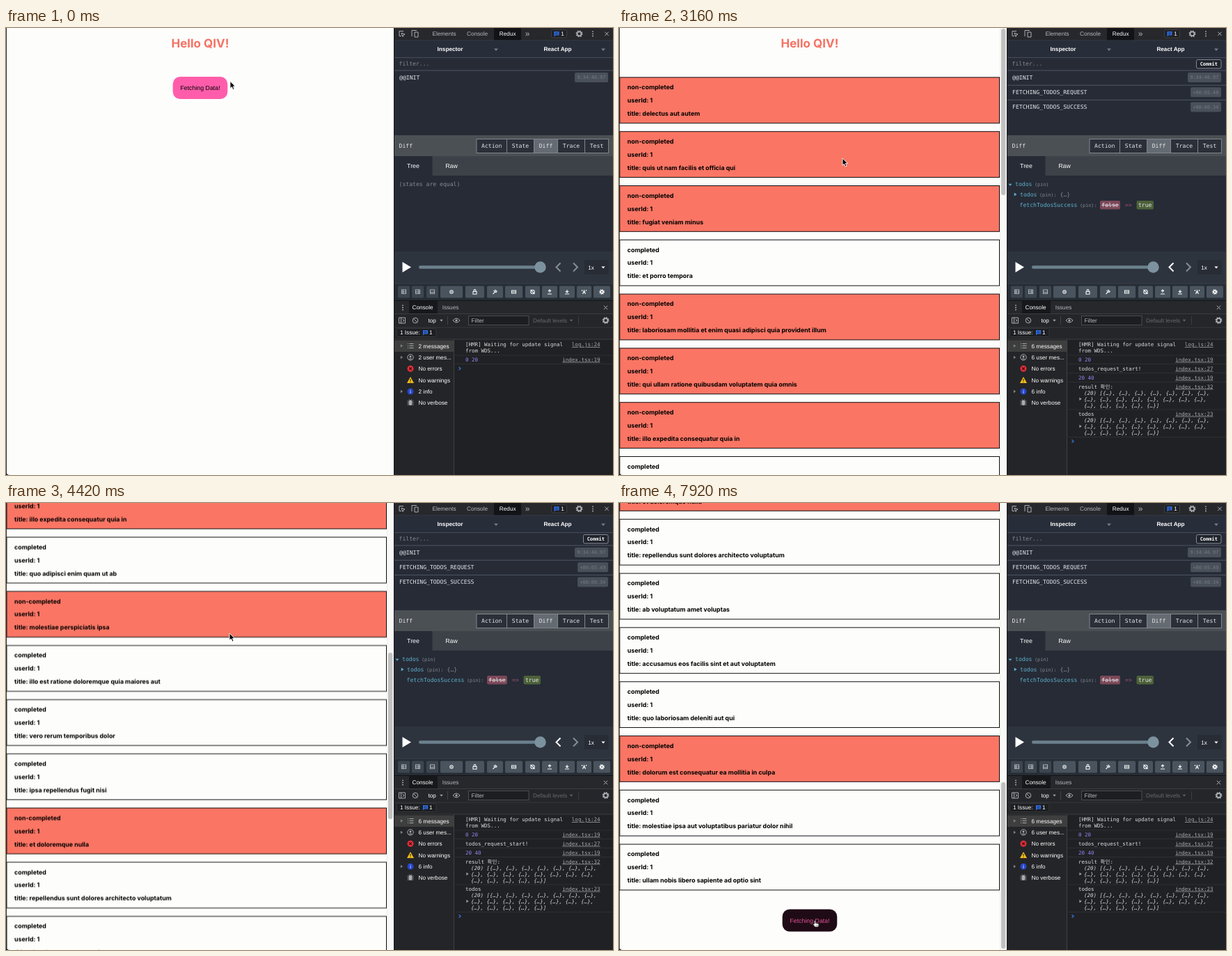
An HTML page for the animation above (8000 ms loop, 872x642 px).

```html
<!DOCTYPE html>
<html lang="en">
<head>
<meta charset="utf-8">
<title>Todo list with state inspector</title>
<style>
html, body { margin: 0; width: 100%; height: 100%; overflow: hidden; background: #fdfdfc; }
svg { display: block; width: 100vw; height: 100vh; }
text { text-rendering: geometricPrecision; white-space: pre; }
.ui { font: 8.2px "Liberation Sans", Arial, sans-serif; fill: #b4b8bd; }
.tab { font-size: 8.8px; }
.mono { font: 8.12px "DejaVu Sans Mono", monospace; fill: #e4e6ea; }
.small { font-size: 6.8px; }
.log { font: 7.5px "DejaVu Sans Mono", "Noto Sans CJK KR", monospace; fill: #d9dadb; }
.white { fill: #fff; }
.dim { fill: #858b95; }
.key { fill: #5fb0cb; }
.num { fill: #9a82f5; }
.link { fill: #a6a8aa; text-decoration: underline; }
.it { font-style: italic; }
.bold { font-weight: 700; }
.mid { text-anchor: middle; }
.end { text-anchor: end; }
.h1 { font: 700 17px Inter, sans-serif; fill: #f57263; }
.card { font: 700 8.85px Inter, sans-serif; fill: #000; }
.btn { font: 8.8px "Liberation Sans", Arial, sans-serif; }
.pill { fill: #ff5dab; }
.line { fill: none; stroke: #a9adb2; stroke-width: 1; }
[class*="a-"] { animation-duration: 8s; animation-iteration-count: infinite; animation-timing-function: linear; }
</style>
</head>
<body>
<script>
const LOOP = 8000, REQUEST = 1580, LIST = 1880, SUCCESS = 2000;
const HOVER_1 = 820, HOVER_2 = 7640, FADE = 320;
const PITCH = 77.8, MAX_SCROLL = 1059;

let css = '';
const pct = ms => (ms / LOOP * 100).toFixed(3) + '%';
const keyframes = (name, frames, timing = 'linear') => {
  css += `@keyframes ${name}{${frames.map(([ms, rule]) => `${pct(ms)}{${rule}}`).join('')}}
.a-${name}{animation-name:${name};animation-timing-function:${timing}}\n`;
};
const during = (name, from, to, body) => {
  keyframes(name, [[0, 'opacity:0'], [from, 'opacity:1'], [to, 'opacity:0']], 'step-end');
  return `<g class="a-${name}">${body}</g>`;
};
const fade = (name, start, from, to) =>
  keyframes(name, [[0, from], [start, from], [Math.min(start + FADE, LOOP), to], [LOOP, to]]);

const text = (x, y, s, cls) => `<text x="${x}" y="${y}" dy=".36em" class="${cls}">${s}</text>`;
const rect = (x, y, w, h, fill, extra = '') =>
  `<rect x="${x}" y="${y}" width="${w}" height="${h}" fill="${fill}" ${extra}/>`;
const path = (d, extra = 'class="line"') => `<path d="${d}" ${extra}/>`;
const at = (x, y, body) => `<g transform="translate(${x} ${y})">${body}</g>`;
const rule = (x, y, w, color) => rect(x, y, w, 1, color);
const down = (x, y, color = '#a0a4aa', r = 3) =>
  path(`M${x - r} ${y - r / 2}h${2 * r}l${-r} ${r * 1.2}z`, `fill="${color}"`);
const right = (x, y, color = '#7d8085', r = 2.2) =>
  path(`M${x - r / 2} ${y - r}v${2 * r}l${r * 1.5} ${-r}z`, `fill="${color}"`);
const gear = (x, y, r = 3, color = '#a9adb2') => at(x, y,
  `<circle r="${r}" fill="none" stroke="${color}" stroke-width="1.8"/>` +
  `<circle r="${r + 1.2}" fill="none" stroke="${color}" stroke-width="1.5" stroke-dasharray="${(r + 1.2) * Math.PI / 8}"/>`);
const cross = (x, y) => path(`M${x - 2.7} ${y - 2.7}l5.4 5.4m0 -5.4l-5.4 5.4`);
const dots = (x, y) => [-3.2, 0, 3.2].map(d => `<circle cx="${x}" cy="${y + d}" r=".9" fill="#b4b8bd"/>`).join('');
const bubble = (x, y) => path(`M${x - 3.5} ${y - 3.5}h7v5.5h-5l-2 2z`, 'fill="#2f6fe8"') +
  path(`M${x - 2} ${y - 1.7}h4m-4 2h4`, 'stroke="#16213a" stroke-width=".8"');

/* Web page */
const todos = `delectus aut autem|quis ut nam facilis et officia qui|fugiat veniam minus|+et porro tempora
laboriosam mollitia et enim quasi adipisci quia provident illum|qui ullam ratione quibusdam voluptatem quia omnis
illo expedita consequatur quia in|+quo adipisci enim quam ut ab|molestiae perspiciatis ipsa
+illo est ratione doloremque quia maiores aut|+vero rerum temporibus dolor|+ipsa repellendus fugit nisi|et doloremque nulla
+repellendus sunt dolores architecto voluptatum|+ab voluptatum amet voluptas|+accusamus eos facilis sint et aut voluptatem
+quo laboriosam deleniti aut qui|dolorum est consequatur ea mollitia in culpa|+molestiae ipsa aut voluptatibus pariatur dolor nihil
+ullam nobis libero sapiente ad optio sint`.split(/[|\n]/);

const card = (item, i) => {
  const done = item[0] === '+';
  return at(0, (70.4 + i * PITCH).toFixed(1),
    rect(1, .5, 545.5, 65.8, done ? '#fdfdfc' : '#fa7564', 'stroke="#111"') +
    text(12, 14.6, done ? 'completed' : 'non-completed', 'card') +
    text(12, 33.5, 'userId: 1', 'card') +
    text(12, 52.4, 'title: ' + item.replace('+', ''), 'card'));
};
const heading = x => text(x, 22, 'Hello QIV!', 'h1 mid');
const button = (x, y, n) =>
  rect(x - 39.3, y - 16, 78.6, 32, '#ff5dab', `rx="10.5" class="a-pill${n}"`) +
  text(x, y, 'Fetching Data!', `btn mid a-label${n}`);
[HOVER_1, HOVER_2].forEach((start, n) => {
  fade('pill' + n, start, 'fill:#ff5dab', 'fill:#000');
  fade('label' + n, start, 'fill:#000', 'fill:#ff5dab');
});

const scroll = [[0, 0], [4040, 0], [4100, 9.5], [4180, 90], [4300, 325], [4420, 564.5],
  [4540, 802], [4680, 1024], [4780, 1052], [4900, MAX_SCROLL], [LOOP, MAX_SCROLL]];
const slide = (name, k) => keyframes(name,
  scroll.map(([ms, y]) => [ms, `transform:translateY(${(y * k).toFixed(2)}px)`]));
slide('scroll', -1);
slide('thumb', 400 / MAX_SCROLL);

const page = rect(0, 0, 558, 642, '#fdfdfc') +
  during('start', 0, LIST, heading(279) + button(279, 86, 0)) +
  during('list', LIST, LOOP,
    `<g class="a-scroll">${heading(274) + todos.map(card).join('') + button(274, 1658.5, 1)}</g>` +
    rect(547, 0, 11, 642, '#f9f9f8') + rect(547, 0, .6, 642, '#e4e4e4') +
    rect(549, 1, 6.4, 239, '#c1c1c1', 'rx="3.2" class="a-thumb"')) +
  rect(0, 0, 1, 642, '#2a2a2c') + path('M0 636Q0 642 6 642H0z', 'fill="#16262c"');

/* State inspector */
const action = (i, name, time) => {
  const y = 71 + i * 21.2, w = time.length * 4.1 + 7;
  return rule(558, y - 10.5, 314, '#4f5765') + text(565, y, name, 'mono') +
    rect(865 - w, y - 7, w, 14, '#4a5059', 'rx="2"') + text(861.3, y, time, 'mono small dim end white" opacity=".72');
};
const segments = [676, 719.5, 758.5, 792.5, 831.5, 865.5];
const segment = (name, i) => {
  const x = segments[i], w = segments[i + 1] - x;
  return rect(x, 159.5, w, 20, name === 'Diff' ? '#656b72' : '#2a2f38', 'stroke="#80868d"') +
    text(x + w / 2, 169.5, name, 'mono mid');
};
const chevron = (x, dir, color) =>
  path(`M${x - 3 * dir} 337.5l${6 * dir} 6l${-6 * dir} 6`, `fill="none" stroke="${color}" stroke-width="2"`);

const grid = 'M-3 -3h6v5.5h-6z';
const tools = [
  [563, 17, grid + 'M-1 -3v5.5M-3 0h6'], [583, 17, grid + 'M1 -3v5.5M-3 0h6'], [604, 17, grid + 'M-3 .5h6'],
  [624, 32, 'M-2.2 0a2.2 2.2 0 1 0 4.4 0a2.2 2.2 0 1 0 -4.4 0M-1 0h2'], [660, 27, 'M-2.5 -.5h5v3.7h-5zM-1.4 -.5v-1.5a1.4 1.4 0 0 1 2.8 0v1.5'],
  [691, 23, 'M-2 -2l4 3M0 -3l3 3M0 0l-3 3'], [717, 25, 'M-3 -2h6v4h-6zM-2 0h4'],
  [746, 21, 'M-2.7 0a2.7 2.7 0 1 0 5.4 0a2.7 2.7 0 1 0 -5.4 0M-3 -3l6 6'], [770, 22, 'M0 1v-4M-2 -1l2 -2l2 2M-3 3h6'],
  [795, 22, 'M0 -3v4M-2 -1l2 2l2 -2M-3 3h6'], [820, 21, 'M-2 3l2 -5l2 5M-3 -3v2M3 -3v2M-1 1h2'], [844, 24, '']];
const tool = ([x, w, d], i) => rect(x, 370.5, w, 17, i < 3 ? '#3d464f' : '#4a545e', 'rx="1.5"') +
  (d ? at(x + w / 2, 379, path(d, `fill="none" stroke="${i < 3 ? '#aab1b8' : '#f4f5f6'}" stroke-width="1.1"`)) : gear(x + w / 2, 379, 1.9, '#fff'));

const diffTree = down(562, 225, '#5fb0cb', 2.5) + text(569, 224, 'todos', 'mono key') + text(597, 224.5, '(pin)', 'mono small dim') +
  right(569, 239, '#5fb0cb', 2.5) + text(576, 239, 'todos', 'mono key') + text(604, 239.5, '(pin):', 'mono small dim') +
  text(633.5, 239, '{…}', 'mono dim') +
  text(575.5, 254, 'fetchTodosSuccess', 'mono key') + text(662, 254.5, '(pin):', 'mono small dim') +
  rect(691, 248, 29, 12.5, '#7b4757', 'rx="2"') +
  text(705.5, 254, 'false', 'mono mid" text-decoration="line-through') +
  text(732, 254, '=>', 'mono mid" style="fill:#a9546f') +
  rect(743.5, 248, 24.5, 12.5, '#4c6139', 'rx="2"') + text(755.7, 254, 'true', 'mono mid');

const inspector = rect(558, 0, 314, 392, '#262b36') +
  rect(558, 0, 314, 18, '#26282c') + rect(701, 0, 39, 18, '#111317') +
  path('M571 4.5h-6v7h3M568 7l5 2l-2 1l-1 2.500z') + path('M583 12v-8.500h7M587 6h5v7h-5z') +
  text(629.5, 8.3, 'Elements', 'ui mid') + text(677, 8.3, 'Console', 'ui mid') + text(720.7, 8.3, 'Redux', 'ui mid white') +
  text(749, 7.5, '»', 'ui mid" style="font-size:12px') +
  rect(783.5, 2.5, 22, 11.5, '#202124', 'rx="2" stroke="#3c4045"') + bubble(791, 8.5) + text(799.5, 8.3, '1', 'ui mid white') +
  gear(823.5, 8.3) + dots(843, 8.3) + cross(863, 8.3) +
  rule(558, 17.5, 314, '#3b4049') + rect(558, 18.5, 314, 24, '#282d3a') +
  text(638, 30.5, 'Inspector', 'ui mid bold white') + text(792.5, 30.5, 'React App', 'ui mid bold white') +
  down(704, 31, '#767c88') + down(858, 31, '#767c88') + rule(558, 42, 314, '#454c5a') +
  text(564.5, 51.5, 'filter...', 'mono dim') +
  action(0, '@@INIT', '9:34:46.97') +
  during('request', REQUEST, LOOP, action(1, 'FETCHING_TODOS_REQUEST', '+00:05.49') +
    rect(829.5, 45.5, 35.5, 12.5, '#20242c', 'rx="2" stroke="#858b94"') + text(847.3, 51.5, 'Commit', 'mono bold mid white" style="font-size:7px')) +
  during('success', SUCCESS, LOOP, action(2, 'FETCHING_TODOS_SUCCESS', '+00:00.34')) +
  rect(558, 154, 314, 30, '#4b5054') + text(564.5, 169.5, 'Diff', 'mono') +
  ['Action', 'State', 'Diff', 'Trace', 'Test'].map(segment).join('') +
  rect(558, 184, 314, 28, '#3c4248') + rect(558, 184, 54.5, 28, '#262b36') +
  text(585, 198, 'Tree', 'ui tab mid white') + text(640, 198, 'Raw', 'ui tab mid white') +
  during('equal', 0, SUCCESS, text(564.5, 224.5, '(states are equal)', 'mono dim')) +
  during('diff', SUCCESS, LOOP, diffTree) +
  rect(558, 321, 314, 46, '#2e343e') + path('M569.5 336v15l12.5 -7.500z', 'fill="#fff"') +
  rect(593, 341.3, 175, 4.4, '#6b818d', 'rx="2.2"') + '<circle cx="767.5" cy="343.5" r="8.2" fill="#7c939f"/>' +
  during('back0', 0, REQUEST, chevron(793.5, -1, '#878d94')) + during('back1', REQUEST, LOOP, chevron(793.5, -1, '#fff')) +
  chevron(818, 1, '#878d94') + rect(831, 333, 34.5, 21, '#272c35') +
  text(840.5, 343.7, '1x', 'ui mid white') + down(858, 343.7, '#fff', 2.6) +
  rect(558, 366.500, 314, 25.5, '#272d35') + rule(558, 366.5, 314, '#3c434c') + tools.map(tool).join('');

/* Console drawer */
const list = n => Array(n).fill('{…}').join(', ');
const arrayLog = (y, label, link) => text(660, y, label, 'log') + text(853.5, y, link, 'log link end') +
  ['(20) [' + list(7) + ',', list(8) + ',', list(5) + ']'].map((s, i) => text(668, y + 9 + i * 9, s, 'log it')).join('') +
  right(662.5, y + 18, '#9a9da1', 2.2);
const logLine = (y, s, link, cls = '') => text(660, y, s, 'log ' + cls) + text(853.5, y, link, 'log link end') + rule(645, y + 6, 227, '#2d2f33');
const prompt = y => path(`M650.5 ${y - 2.3}l2.600 2.300l-2.600 2.300`, 'fill="none" stroke="#3673d8" stroke-width="1.2"');
const counts = n => text(592.5, 456.7, n + ' messages', 'ui white') +
  text(592.5, 473.1, n + ' user mes...', 'ui white') + text(592.5, 522, n + ' info', 'ui white');
const sideIcons = path('M577 453.500h1m1.500 0h6m-8.500 3h1m1.500 0h6m-8.500 3h1m1.500 0h6') +
  at(581, 473, '<circle r="4.2" fill="none" stroke="#a9adb2"/><circle cy="-1" r="1.5" fill="#a9adb2"/><path d="M-2.700 2.700q2.700 -2.500 5.400 0z" fill="#a9adb2"/>') +
  at(581, 522, '<circle r="4.5" fill="#2746c8"/><path d="M0 -2.500v1m0 1v3" stroke="#b8c6ff" stroke-width="1.2"/>');

const drawer = rect(558, 391, 314, 251, '#202124') + rule(558, 391, 314, '#111317') +
  rect(558, 392, 314, 18, '#26282c') + rect(579, 392, 41, 18, '#17181b') + dots(570, 401.5) +
  text(598.5, 401.5, 'Console', 'ui mid white') + text(638.5, 401.5, 'Issues', 'ui mid') + cross(861.5, 401.5) +
  rule(558, 410, 314, '#3a3d41') + rect(558, 411, 314, 36, '#242629') +
  path('M564.500 416h9v8h-9zM567.500 416v8M569.500 418l2.500 2l-2.500 2') +
  at(588, 420, '<circle r="3.8" class="line"/><path d="M-2.700 -2.700l5.400 5.400" class="line"/>') +
  text(606.5, 420, 'top', 'ui white') + down(625.5, 420, '#a0a4aa', 2.3) + rect(634, 414, 1, 12, '#42454a') +
  path('M642 420q5 -6 10 0q-5 6 -10 0z') + '<circle cx="647" cy="420" r="1.6" fill="#a9adb2"/>' +
  rect(664.5, 413.5, 86.5, 13, '#1d1e21', 'stroke="#4a4d51"') + text(668.5, 420.3, 'Filter', 'ui') +
  text(757, 420, 'Default levels', 'ui" style="fill:#66696e') + down(812, 420, '#66696e', 2.3) + rect(822, 414, 1, 12, '#3a3d41') + gear(861.5, 420) +
  rule(558, 429.5, 314, '#34373b') + rect(561.5, 431.5, 56.5, 12, '#1e1f22', 'rx="2" stroke="#34373b"') +
  text(566, 437.5, '1 Issue:', 'ui white') + bubble(602.5, 437.5) + text(608, 437.5, '1', 'ui white') +
  rule(558, 446.5, 314, '#3a3d41') + rect(558, 447.5, 85, 195, '#242528') + rect(558, 448.5, 85, 16.5, '#3d3e3d') +
  rect(643, 447, 1, 195, '#3f4246') + [456.5, 473, 522].map(y => right(568, y)).join('') +
  during('icons0', 0, LIST, sideIcons) + during('icons1', SUCCESS, LOOP, sideIcons) +
  at(581, 489.3, '<circle r="4.5" fill="#e0303a"/><path d="M-1.800 -1.800l3.600 3.600m0 -3.600l-3.600 3.600" stroke="#40090c" stroke-width="1.2"/>') +
  at(581, 505.5, '<path d="M0 -4.500l5 9h-10z" fill="#f3bd1a"/><path d="M0 -1.500v3m0 1v1" stroke="#3a2c00" stroke-width="1.2"/>') +
  at(581, 538, '<rect x="-2.300" y="-3.500" width="4.600" height="7.500" rx="2.200" fill="#a9adb2"/><path d="M-4.500 -2h9m-9 2.500h9m-9 2.500h9M-2 -4.800l1 1.500m3 -1.500l-1 1.500" stroke="#a9adb2" stroke-width=".8"/>') +
  text(592.5, 489.3, 'No errors', 'ui white') + text(592.5, 505.6, 'No warnings', 'ui white') + text(592.5, 538.3, 'No verbose', 'ui white') +
  during('count2', 0, REQUEST, counts(2)) + during('count4', REQUEST, LIST, counts(4)) +
  during('count5', LIST, SUCCESS, counts(5)) + during('count6', SUCCESS, LOOP, counts(6)) +
  text(660, 454.3, '[HMR] Waiting for update signal', 'log') + text(853.5, 454.3, 'log.js:24', 'log link end') +
  text(660, 463, 'from WDS...', 'log') + rule(645, 469.5, 227, '#2d2f33') +
  logLine(476, '0 20', 'index.tsx:19', 'num') +
  during('prompt0', 0, REQUEST, prompt(489)) +
  during('logs1', REQUEST, LOOP, logLine(489, 'todos_request_start!', 'index.tsx:27') + logLine(502, '20 40', 'index.tsx:19', 'num')) +
  during('prompt1', REQUEST, SUCCESS, prompt(514.7)) +
  during('logs2', SUCCESS, LOOP, arrayLog(514.8, 'result 확인:', 'index.tsx:32') + rule(645, 547.5, 227, '#2d2f33') +
    arrayLog(554, 'todos', 'index.tsx:23') + rule(645, 587, 227, '#2d2f33') + prompt(593.5));

/* Pointer */
const route = [[0, 322, 76.5], [650, 322, 76.5], [1000, 307, 88], [2300, 307, 88], [2900, 321, 187],
  [5250, 321, 187], [5850, 322, 303], [7050, 322, 303], [7700, 281.5, 599], [LOOP, 281.5, 599]];
keyframes('pointer', route.map(([ms, x, y]) => [ms, `transform:translate(${x}px,${y}px)`]), 'ease-in-out');
const arrow = path('M0 0v10.300l2.400 -2.200l1.700 4l1.900 -.8l-1.700 -3.900h3.200z',
  'fill="#000" stroke="#fff" stroke-width=".9" stroke-linejoin="round"');
const hand = path('M-1 .8q1 -1.600 2 0v3.400l3.700 .9q1 .4 .8 1.600l-.7 3.300h-4.800l-3 -4q.3 -1.400 2 -.2z',
  'fill="#fff" stroke="#111" stroke-width=".8" stroke-linejoin="round"') + path('M1.800 6.500v2.200m1.500 -2.200v2.200', 'stroke="#333" stroke-width=".5"');
const pointer = `<g class="a-pointer">${
  during('arrow0', 0, HOVER_1, arrow) + during('hand0', HOVER_1, LIST, hand) +
  during('arrow1', LIST, HOVER_2, arrow) + during('hand1', HOVER_2, LOOP, hand)}</g>`;

document.body.innerHTML = `<style>${css}</style><svg viewBox="0 0 872 642">${
  page + rect(557, 0, 1.2, 642, '#15171a') + inspector + drawer + pointer}</svg>`;
</script>
</body>
</html>
```
